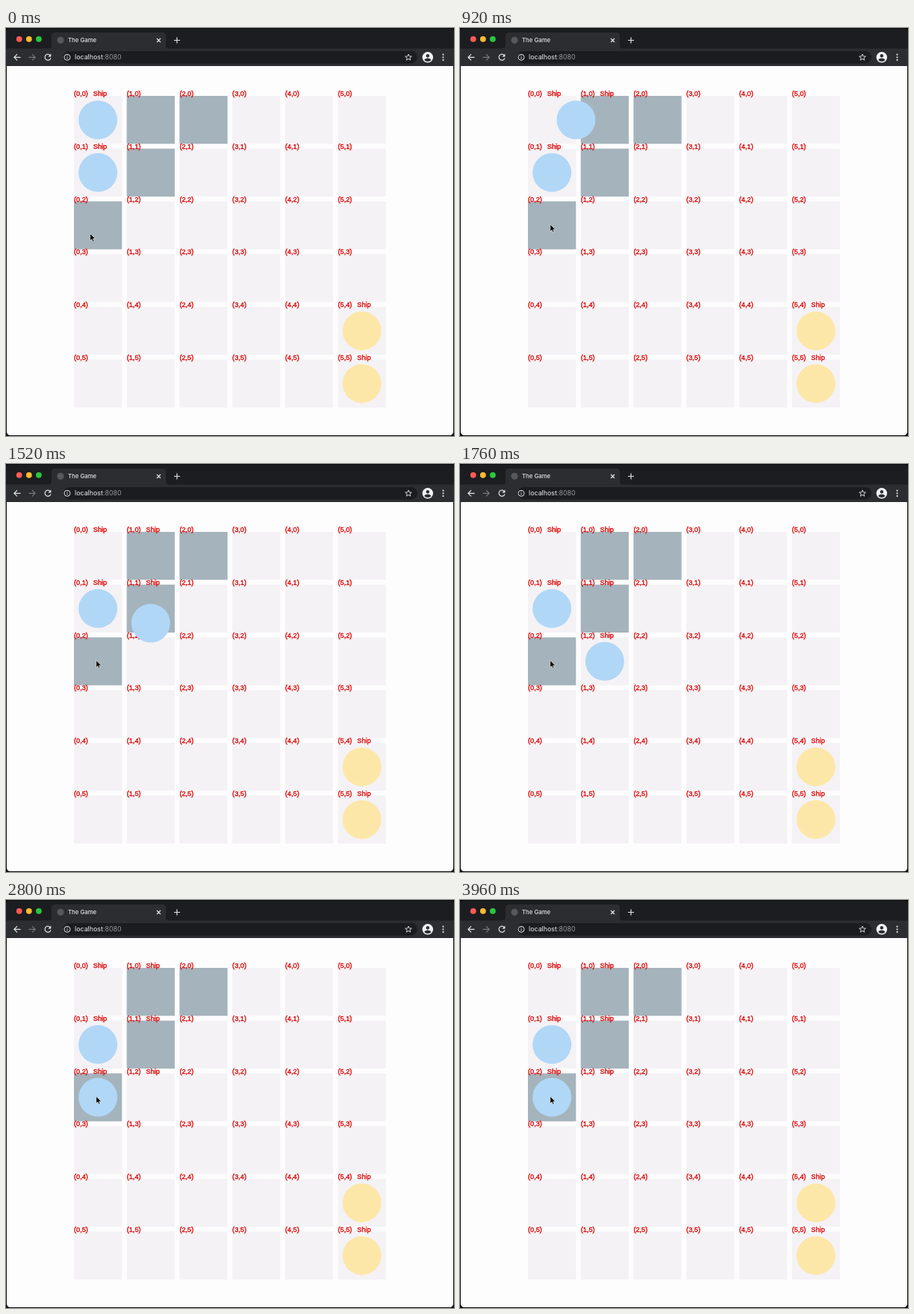
Animation of 600x547 px, one loop 4 s. Source, as an HTML page:

```html
<!DOCTYPE html>
<html lang="en">
<head>
<meta charset="utf-8">
<title>The Game</title>
<style>
html, body { margin: 0; width: 100%; height: 100%; overflow: hidden; background: #0c0c0e; }
svg { display: block; }
.ui { font-family: Inter, Roboto, sans-serif; }
.label { font: 9.2px "Liberation Sans", Arial, sans-serif; fill: #d80a0a; stroke: #d80a0a; stroke-width: .4; }
.icon { fill: none; stroke: #e4e5e8; stroke-width: 1.2; }
</style>
</head>
<body>
<svg width="600" height="547" viewBox="0 0 600 547">
  <rect width="600" height="547" fill="#0c0c0e"/>
  <path d="M1 51H599V541Q599 546 594 546H6Q1 546 1 541Z" fill="#fefdfe"/>

  <path d="M0 28V5Q0 1 5 1H595Q600 1 600 5V28Z" fill="#1c1d20"/>
  <path d="M56 28Q61 28 61 23V11Q61 6 66 6H209Q214 6 214 11V23Q214 28 219 28Z" fill="#2c2d31"/>
  <rect y="27.5" width="600" height="23.5" fill="#2c2d31"/>
  <rect x="77" y="31" width="474" height="16.5" rx="8.2" fill="#1b1c1f"/>

  <circle cx="17.7" cy="14.8" r="3.9" fill="#fc5b57"/>
  <circle cx="30.8" cy="14.8" r="3.9" fill="#fdbc2e"/>
  <circle cx="43.9" cy="14.8" r="3.9" fill="#29c840"/>
  <circle cx="73" cy="16.3" r="4.6" fill="#55585c"/>
  <text class="ui" x="83" y="19.3" font-size="7.8" font-weight="500" fill="#e4e5e8">The Game</text>
  <path class="icon" d="M202 14l5 5M207 14l-5 5M225 16.5h8M229 12.5v8"/>

  <path class="icon" d="M19.5 39.3H11M15 35.2l-4.1 4.1 4.1 4.1"/>
  <path class="icon" style="stroke:#77797d" d="M30.5 39.3H39M35 35.2l4.1 4.1-4.1 4.1"/>
  <path class="icon" d="M59.2 36.6A4 4 0 1 0 60 40.3"/>
  <path d="M60.4 34.6V38.6H56.4Z" fill="#e4e5e8"/>
  <circle class="icon" style="stroke-width:1" cx="82" cy="39.3" r="4"/>
  <path class="icon" style="stroke-width:1" d="M82 38.8v2.6M82 36.8v1"/>
  <text class="ui" x="92" y="42.4" font-size="8.9" fill="#eeeff1">localhost<tspan fill="#96999d">:8080</tspan></text>
  <path class="icon" style="stroke-width:.9" d="M539 35l1.2 2.9 3.1.2-2.4 2 .8 3-2.7-1.7-2.7 1.7.8-3-2.4-2 3.1-.2Z"/>
  <circle cx="564.8" cy="39.3" r="7.2" fill="#f1f2f4"/>
  <circle cx="564.8" cy="37.2" r="2.2" fill="#2c2d31"/>
  <path d="M560.3 43.2Q561 40.6 564.8 40.6T569.3 43.2Q567.5 45 564.8 45T560.3 43.2Z" fill="#2c2d31"/>
  <g fill="#e4e5e8">
    <circle cx="585.5" cy="35.7" r="1.1"/><circle cx="585.5" cy="39.3" r="1.1"/><circle cx="585.5" cy="42.9" r="1.1"/>
  </g>

  <g id="cells"></g>
  <g id="labels"></g>
  <g id="ships"></g>
  <path id="cursor" d="M0 0V9.6L2.2 7.6 3.6 10.8 5.2 10.1 3.8 7H6.8Z" fill="#000" stroke="#fff" stroke-width=".6"/>
</svg>
<script>
const LOOP = 4000, ORIGIN = 91, PITCH = 70.7, SIZE = 64.3, RADIUS = 26;
const START = 784, STEP = 327, MOVE = 300;
const route = [[0, 0], [1, 0], [1, 1], [1, 2], [0, 2]];
const dark = ["1,0", "2,0", "1,1", "0,2"];
const ships = [["0,0", 0], ["0,1", 0], ["5,4", 1], ["5,5", 1]];
const colors = ["#b1d7f7", "#fde7a8"];

const $ = id => document.getElementById(id);
const edge = i => ORIGIN + PITCH * i;
const mid = i => edge(i) + SIZE / 2;
const clamp = v => Math.max(0, Math.min(1, v));
const lerp = (a, b, k) => a + (b - a) * k;

function add(parent, tag, attrs, text = "") {
  const el = document.createElementNS("http://www.w3.org/2000/svg", tag);
  for (const key in attrs) el.setAttribute(key, attrs[key]);
  el.textContent = text;
  return $(parent).appendChild(el);
}

const shipTag = (x, y) =>
  add("labels", "text", { class: "label", x: edge(x) + 25.8, y: edge(y) + .3 }, "Ship");

for (let y = 0; y < 6; y++) {
  for (let x = 0; x < 6; x++) {
    const fill = dark.includes(x + "," + y) ? "#a5b3bc" : "#f4f2f5";
    add("cells", "rect", { x: edge(x), y: edge(y), width: SIZE, height: SIZE, fill });
    add("labels", "text", { class: "label", x: edge(x), y: edge(y) + .3 }, `(${x},${y})`);
  }
}

const discs = ships.map(([pos, team]) => {
  const [x, y] = pos.split(",").map(Number);
  shipTag(x, y);
  return add("ships", "circle", { cx: mid(x), cy: mid(y), r: RADIUS, fill: colors[team] });
});
const trail = route.slice(1).map(([x, y]) => shipTag(x, y));

function draw(t) {
  // The ship crosses one cell per step, with a short rest between steps.
  const leg = Math.max(0, Math.min(route.length - 2, Math.floor((t - START) / STEP)));
  const k = clamp((t - START - leg * STEP) / MOVE);
  const [from, to] = [route[leg], route[leg + 1]];
  discs[0].setAttribute("cx", mid(lerp(from[0], to[0], k)));
  discs[0].setAttribute("cy", mid(lerp(from[1], to[1], k)));
  trail.forEach((el, i) =>
    el.setAttribute("visibility", t >= START + i * STEP ? "visible" : "hidden"));

  const c = clamp((t - 210) / 260);
  const ease = c * c * (3 - 2 * c);
  $("cursor").setAttribute("transform",
    `translate(${lerp(112.7, 120.8, ease)} ${lerp(275.6, 263.2, ease)})`);
}

const begin = performance.now();
function tick() {
  draw((performance.now() - begin) % LOOP);
  requestAnimationFrame(tick);
}
tick();
</script>
</body>
</html>
```
